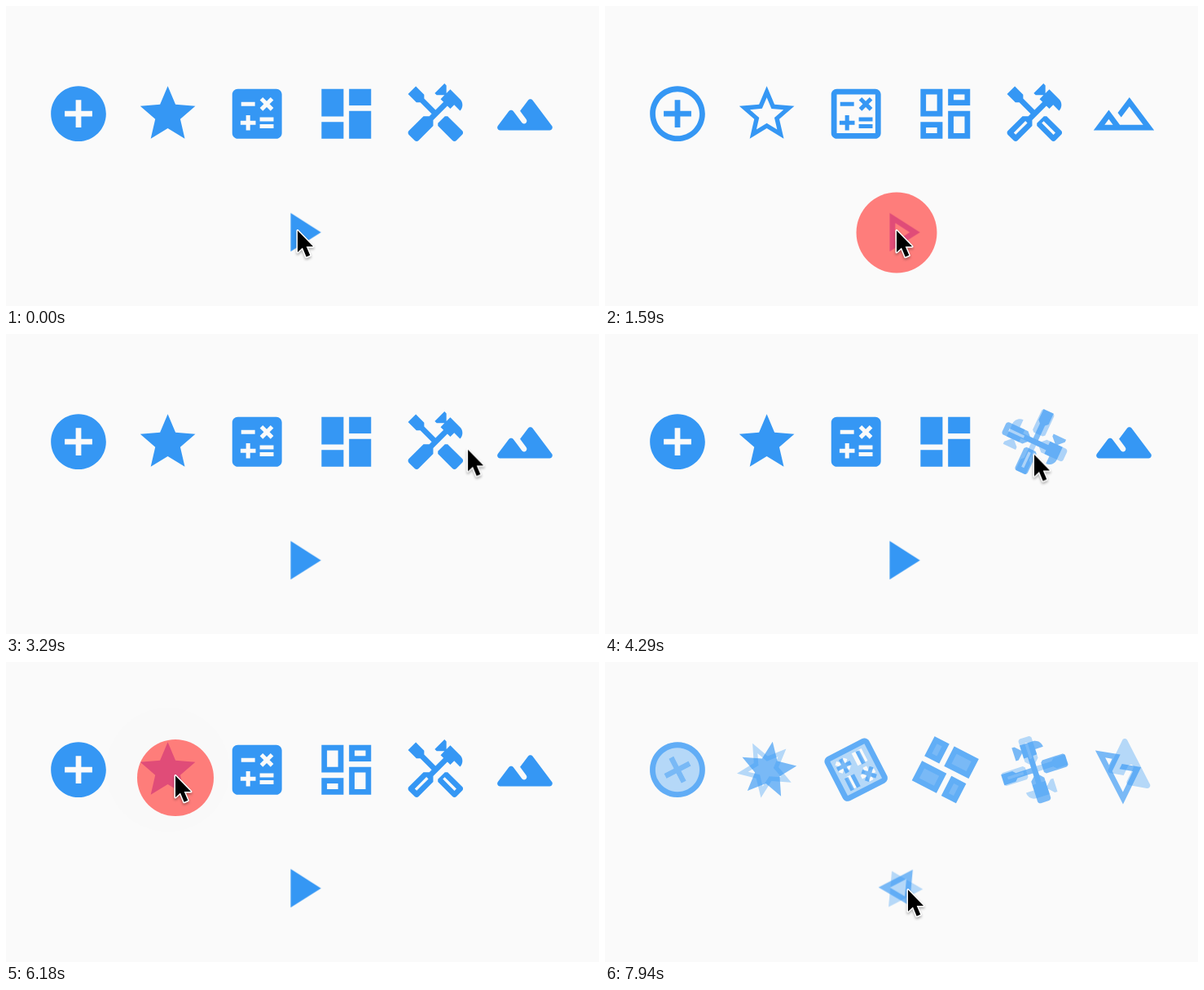
An HTML page for the animation above (8000 ms loop, 728x368 px).

```html
<!DOCTYPE html>
<html lang="en">
<head>
<meta charset="utf-8">
<title>Toggling icons</title>
<style>
@property --x { syntax: '<number>'; inherits: true; initial-value: 0; }

html, body { margin: 0; width: 100%; height: 100%; overflow: hidden; background: #fafafa; }
.stage { display: block; width: 728px; height: 368px; }

/* --x runs from 0 (filled) to 1 (outlined) */
.icon {
  overflow: visible;
  fill: #3597f4;
  fill-rule: evenodd;
  animation: all 8s linear infinite;
}
.icon path { transform-origin: 12px 12px; }
.filled { transform: rotate(calc(var(--x) * -180deg)); opacity: calc(1 - var(--x)); }
.outlined { transform: rotate(calc((1 - var(--x)) * 180deg)); opacity: var(--x); }
.tools { animation-name: tools; }
.board { animation-name: board; }
.star { animation-name: star; }

@keyframes all {
  0%, 4.3125% { --x: 0; }
  16.25%, 22.375% { --x: 1; }
  34.3125%, 91.4875% { --x: 0; }
  100% { --x: .713; }
}
@keyframes tools {
  0%, 4.3125% { --x: 0; }
  16.25%, 22.375% { --x: 1; }
  34.3125%, 46.3375% { --x: 0; }
  58.275%, 91.4875% { --x: 1; }
  100% { --x: .287; }
}
@keyframes board {
  0%, 4.3125% { --x: 0; }
  16.25%, 22.375% { --x: 1; }
  34.3125%, 63.875% { --x: 0; }
  75.8125%, 91.4875% { --x: 1; }
  100% { --x: .287; }
}
@keyframes star {
  0%, 4.3125% { --x: 0; }
  16.25%, 22.375% { --x: 1; }
  34.3125%, 78% { --x: 0; }
  89.9375%, 91.4875% { --x: 1; }
  100% { --x: .287; }
}

/* grey splash behind the tapped button */
.splash { opacity: 0; animation: splash 8s linear infinite, spot 8s step-end infinite; }
@keyframes splash {
  0%, 3.44%, 8.06%, 21.5%, 26.125%, 45.46%, 50.09%, 63%, 67.625%,
  77.125%, 81.75%, 90.61%, 95.24%, 100% { opacity: 0; }
  4.69%, 22.75%, 46.71%, 64.25%, 78.375%, 91.86% { opacity: .06; }
}
@keyframes spot {
  0%, 86% { transform: translate(363px, 277.5px); }
  40% { transform: translate(527.4px, 132.2px); }
  58% { transform: translate(417.8px, 132.2px); }
  72% { transform: translate(198.6px, 132.2px); }
}

.pointer { animation: move 8s linear infinite; }
@keyframes move {
  0%, 29.3% { transform: translate(358px, 278px); }
  30.125% { transform: translate(363px, 274px); }
  35% { transform: translate(480px, 190px); }
  39.75% { transform: translate(647px, 132px); animation-timing-function: ease-out; }
  42.625%, 55.6% { transform: translate(527px, 150.5px); animation-timing-function: ease-in-out; }
  61.9%, 66.25% { transform: translate(417px, 122px); animation-timing-function: ease-in-out; }
  74.75%, 78.75% { transform: translate(208px, 142px); animation-timing-function: ease-in-out; }
  81.25% { transform: translate(124px, 180px); }
  85.25% { transform: translate(300px, 250px); animation-timing-function: ease-out; }
  88.1%, 100% { transform: translate(372px, 282px); }
}

/* red press mark: two blended discs */
.press { r: 0px; animation: move 8s linear infinite, press 8s linear infinite; }
.tint { fill: rgb(255, 128, 125); mix-blend-mode: multiply; }
.glow { fill: rgb(216, 0, 0); mix-blend-mode: screen; }
@keyframes press {
  0%, 1.499%, 7.7875%, 19.874%, 25.85%, 44.874%, 49.8125%, 62.374%, 67.35%,
  76.499%, 81.475%, 89.124%, 94.9625%, 100% { r: 0px; }
  1.5%, 3.6875% { r: 45.5px; }
  19.875% { r: 49.5px; }
  21.375%, 21.75% { r: 45.5px; }
  44.875% { r: 49.5px; }
  45.7125% { r: 45.5px; }
  62.375% { r: 50px; }
  63.25% { r: 45.5px; }
  76.5% { r: 48px; }
  77.25%, 77.375% { r: 47px; }
  89.125% { r: 47px; }
  90.8625% { r: 45.5px; }
}

.arrow { stroke-linejoin: round; filter: drop-shadow(0 2px 1.5px rgba(0, 0, 0, .3)); }
</style>
</head>
<body>
<svg class="stage" viewBox="0 0 728 368">
  <rect width="728" height="368" fill="#fafafa"/>
  <circle class="splash" r="76"/>

  <svg class="icon" x="48.4" y="91.6" width="81.2" height="81.2" viewBox="0 0 24 24">
    <path class="filled" d="M12 2C6.48 2 2 6.48 2 12s4.48 10 10 10 10-4.48 10-10S17.52 2 12 2zm5 11h-4v4h-2v-4H7v-2h4V7h2v4h4v2z"/>
    <path class="outlined" d="M13 7h-2v4H7v2h4v4h2v-4h4v-2h-4V7zm-1-5C6.48 2 2 6.48 2 12s4.48 10 10 10 10-4.48 10-10S17.52 2 12 2zm0 18c-4.41 0-8-3.59-8-8s3.59-8 8-8 8 3.59 8 8-3.59 8-8 8z"/>
  </svg>

  <svg class="icon star" x="158" y="91.6" width="81.2" height="81.2" viewBox="0 0 24 24">
    <path class="filled" d="M12 17.27L18.18 21l-1.64-7.03L22 9.24l-7.19-.61L12 2 9.19 8.63 2 9.24l5.46 4.73L5.82 21z"/>
    <path class="outlined" d="M22 9.24l-7.19-.62L12 2 9.19 8.63 2 9.24l5.46 4.73L5.82 21 12 17.27 18.18 21l-1.63-7.03L22 9.24zM12 15.4l-3.76 2.27 1-4.28-3.32-2.88 4.38-.38L12 6.1l1.71 4.04 4.38.38-3.32 2.88 1 4.28L12 15.4z"/>
  </svg>

  <svg class="icon" x="267.6" y="91.6" width="81.2" height="81.2" viewBox="0 0 24 24">
    <path class="filled" d="M19 3H5c-1.1 0-2 .9-2 2v14c0 1.1.9 2 2 2h14c1.1 0 2-.9 2-2V5c0-1.1-.9-2-2-2zM6.25 7.72h5v1.5h-5zM13 15.75h5v1.5h-5zM13 13.25h5v1.5h-5zM8 18h1.5v-2h2v-1.5h-2v-2H8v2H6V16h2zM14.09 10.95l1.41-1.41 1.41 1.41 1.06-1.06-1.41-1.42 1.41-1.41L16.91 6 15.5 7.41 14.09 6l-1.06 1.06 1.41 1.41-1.41 1.42z"/>
    <path class="outlined" d="M19 3H5c-1.1 0-2 .9-2 2v14c0 1.1.9 2 2 2h14c1.1 0 2-.9 2-2V5c0-1.1-.9-2-2-2zm0 16H5V5h14v14zM6.25 7.72h5v1.5h-5zM13 15.75h5v1.5h-5zM13 13.25h5v1.5h-5zM8 18h1.5v-2h2v-1.5h-2v-2H8v2H6V16h2zM14.09 10.95l1.41-1.41 1.41 1.41 1.06-1.06-1.41-1.42 1.41-1.41L16.91 6 15.5 7.41 14.09 6l-1.06 1.06 1.41 1.41-1.41 1.42z"/>
  </svg>

  <svg class="icon board" x="377.2" y="91.6" width="81.2" height="81.2" viewBox="0 0 24 24">
    <path class="filled" d="M3 13h8V3H3v10zm0 8h8v-6H3v6zm10 0h8V11h-8v10zm0-18v6h8V3h-8z"/>
    <path class="outlined" d="M19 5v2h-4V5h4M9 5v6H5V5h4m10 8v6h-4v-6h4M9 17v2H5v-2h4M21 3h-8v6h8V3zM11 3H3v10h8V3zm10 8h-8v10h8V11zm-10 4H3v6h8v-6z"/>
  </svg>

  <svg class="icon tools" x="486.8" y="91.6" width="81.2" height="81.2" viewBox="0 0 24 24">
    <path class="filled" d="M21.67 18.17l-5.3-5.3h-.99l-2.54 2.54v.99l5.3 5.3c.39.39 1.02.39 1.41 0l2.12-2.12c.39-.38.39-1.02 0-1.41zM17.34 10.19l1.41-1.41 2.12 2.12c1.17-1.17 1.17-3.07 0-4.24l-3.54-3.54-1.41 1.41V1.71L15.22 1l-3.54 3.54.71.71h2.83l-1.41 1.41 1.06 1.06-2.89 2.89-4.13-4.13V5.06L4.83 2.04 2 4.87 5.03 7.9h1.41l4.13 4.13-.85.85H7.6l-5.3 5.3c-.39.39-.39 1.02 0 1.41l2.12 2.12c.39.39 1.02.39 1.41 0l5.3-5.3v-2.12l5.15-5.15z"/>
    <path class="outlined" d="M21.67 18.17l-5.3-5.3h-.99l-2.54 2.54v.99l5.3 5.3c.39.39 1.02.39 1.41 0l2.12-2.12c.39-.38.39-1.02 0-1.41zm-2.83 1.42l-4.24-4.24.71-.71 4.24 4.24zM17.34 10.19l1.41-1.41 2.12 2.12c1.17-1.17 1.17-3.07 0-4.24l-3.54-3.54-1.41 1.41V1.71L15.22 1l-3.54 3.54.71.71h2.83l-1.41 1.41 1.06 1.06-2.89 2.89-4.13-4.13V5.06L4.83 2.04 2 4.87 5.03 7.9h1.41l4.13 4.13-.85.85H7.6l-5.3 5.3c-.39.39-.39 1.02 0 1.41l2.12 2.12c.39.39 1.02.39 1.41 0l5.3-5.3v-2.12l5.15-5.15zM9.38 15.34l-4.24 4.24-.71-.71 4.24-4.24z"/>
  </svg>

  <svg class="icon" x="596.4" y="91.6" width="81.2" height="81.2" viewBox="0 0 24 24">
    <path class="filled" d="M13.2 7.07L10.25 11l2.25 3c.33.44.24 1.07-.2 1.4-.44.33-1.07.25-1.4-.2-1.05-1.4-2.31-3.07-3.1-4.14-.4-.53-1.2-.53-1.6 0l-4 5.33c-.49.67-.02 1.61.8 1.61h18c.82 0 1.29-.94.8-1.6l-7-9.33c-.4-.54-1.2-.54-1.6-.01z"/>
    <path class="outlined" d="M14 6l-4.22 5.63 1.25 1.67L14 9.33 19 16h-8.46l-4.01-5.37L1 18h22L14 6zM5 16l1.52-2.03L8.04 16H5z"/>
  </svg>

  <svg class="icon" x="322.4" y="236.9" width="81.2" height="81.2" viewBox="0 0 24 24">
    <path class="filled" d="M8 5v14l11-7z"/>
    <path class="outlined" d="M10 8.64L15.27 12 10 15.36V8.64M8 5v14l11-7L8 5z"/>
  </svg>

  <circle class="press tint"/>
  <circle class="press glow"/>
  <g class="pointer">
    <path class="arrow" d="M0-2.5V24l6-5.5L10.7 29.8l4.6-2L10.7 17H19z" stroke="#fff" stroke-width="3" paint-order="stroke"/>
  </g>
</svg>
</body>
</html>
```
